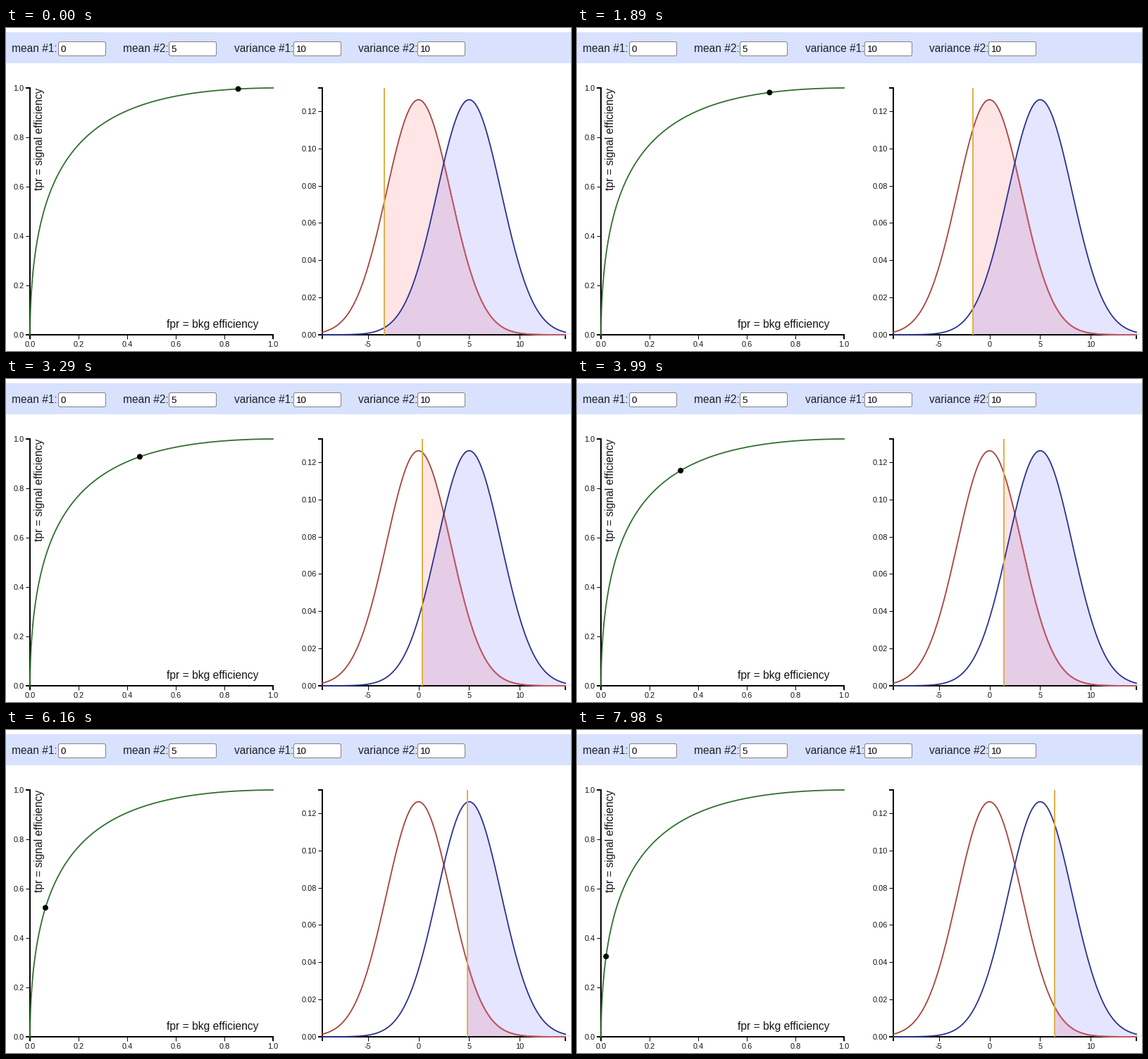
Animation, 802 px wide and 458 px high, one loop 8 s. Source, as a matplotlib script:

```python
import math

import numpy as np
import matplotlib.pyplot as plt
from matplotlib.animation import FuncAnimation
from matplotlib.patches import Circle, FancyBboxPatch, Rectangle

W, H, DPI = 802, 458, 64
LOOP, INTERVAL, STEP = 8000, 20, 70
PT = 72 / DPI  # points per pixel

MEAN1, MEAN2, SIGMA = 0, 5, math.sqrt(10)
X_MIN, X_MAX = MEAN1 - 3 * SIGMA, MEAN2 + 3 * SIGMA
PEAK = 1 / (SIGMA * math.sqrt(2 * math.pi))
TOP, BASE = 85, 435
ROC_L, ROC_R = 34, 379
PDF_L, PDF_R = 449, 794

RED, BLUE, GREEN = "#a8433c", "#2b3192", "#2f702d"

# The dragged threshold: time in ms, value
KEY_T = np.array([0, 1190, 2590, 3990, 4900, 6160, 7980])
KEY_V = np.array([-3.37, -2.42, -0.66, 1.41, 2.53, 4.82, 6.43])
KEY_M = np.gradient(KEY_V, KEY_T)


def threshold(t):
    """Smooth Hermite path through the keys."""
    t = min(max(t, 0), KEY_T[-1])
    i = min(int(np.searchsorted(KEY_T, t, side="right")) - 1, len(KEY_T) - 2)
    d = KEY_T[i + 1] - KEY_T[i]
    s = (t - KEY_T[i]) / d
    return ((2 * s**3 - 3 * s**2 + 1) * KEY_V[i]
            + (s**3 - 2 * s**2 + s) * d * KEY_M[i]
            + (3 * s**2 - 2 * s**3) * KEY_V[i + 1]
            + (s**3 - s**2) * d * KEY_M[i + 1])


def pdf(x, mean):
    return PEAK * np.exp(-((x - mean) ** 2) / (2 * SIGMA**2))


def above(x, mean):
    """Share of the distribution above x."""
    return 0.5 * math.erfc((x - mean) / (SIGMA * math.sqrt(2)))


def pdf_x(x):
    return PDF_L + (x - X_MIN) / (X_MAX - X_MIN) * (PDF_R - PDF_L)


def pdf_y(p):
    return BASE - p / (1.05 * PEAK) * (BASE - TOP)


def roc_point(x):
    return (ROC_L + above(x, MEAN1) * (ROC_R - ROC_L),
            BASE - above(x, MEAN2) * (BASE - TOP))


def curve(mean, lo, hi):
    x = np.linspace(lo, hi, 160)
    return pdf_x(x), pdf_y(pdf(x, mean))


def area(mean, lo):
    x, y = curve(mean, lo, X_MAX)
    return np.column_stack([np.r_[x[0], x, x[-1]], np.r_[BASE, y, BASE]])


fig = plt.figure(figsize=(W / DPI, H / DPI), dpi=DPI, facecolor="white")
ax = fig.add_axes([0, 0, 1, 1])
ax.set_xlim(0, W)
ax.set_ylim(H, 0)
ax.axis("off")


def line(x, y, color="black", width=1.0, z=3, **kw):
    return ax.plot(x, y, color=color, lw=width * PT, zorder=z, **kw)[0]


def label(x, y, s, size, color="#141414", **kw):
    ax.text(x, y, s, fontsize=size * PT, family="Liberation Sans",
            color=color, va="baseline", zorder=6, **kw)


def field(x, name, value, box_x):
    label(x, 34, name, 15.5, color="#1f222c")
    ax.add_patch(FancyBboxPatch((box_x + 0.5, 19.5), 67, 20,
                                boxstyle="round,pad=0,rounding_size=2.5",
                                fc="white", ec="#80828a", lw=PT, zorder=2))
    label(box_x + 3.5, 34, value, 13.33, color="black")


def axes_frame(left, right, x_ticks, y_ticks):
    """Axis lines with end ticks; ticks are (position, text) pairs."""
    line([left - 6, left, left, left - 6], [TOP, TOP, BASE, BASE], width=2,
         solid_joinstyle="miter", solid_capstyle="butt")
    line([left, left, right, right], [BASE + 6, BASE, BASE, BASE + 6],
         width=2, solid_joinstyle="miter", solid_capstyle="butt")
    for x, s in x_ticks:
        line([x, x], [BASE, BASE + 6], solid_capstyle="butt")
        label(x, 452, s, 11, ha="center")
    for y, s in y_ticks:
        line([left - 6, left], [y, y], solid_capstyle="butt")
        label(left - 8.5, y + 4, s, 11, ha="right")


# Header
ax.add_patch(Rectangle((0, 6), W, 44, fc="#d8e2fe", ec="none", zorder=1))
field(8, "mean #1:", "0", 74)
field(166, "mean #2:", "5", 231)
field(323.5, "variance #1:", "10", 408)
field(500, "variance #2:", "10", 584)

# Efficiency curve
fifths = np.arange(6) / 5
axes_frame(ROC_L, ROC_R,
           [(ROC_L + v * (ROC_R - ROC_L), f"{v:.1f}") for v in fifths],
           [(BASE - v * (BASE - TOP), f"{v:.1f}") for v in fifths])
label(359, 425, "fpr = bkg efficiency", 15.6, ha="right")
label(52, 84.5, "tpr = signal efficiency", 15.5, ha="right",
      rotation=90, rotation_mode="anchor")
roc = np.array([roc_point(x) for x in np.linspace(-13, 18, 220)])
line(roc[:, 0], roc[:, 1], GREEN, 1.8, z=4)

# Distributions
axes_frame(PDF_L, PDF_R,
           [(pdf_x(v), str(v)) for v in (-5, 0, 5, 10)],
           [(pdf_y(v), f"{v:.2f}") for v in np.arange(7) * 0.02])
line([PDF_R + 1, W], [BASE - 1, BASE - 1], "#e3e3f8", 1.5, z=2)
line(*curve(MEAN1, X_MIN, X_MAX), RED, 1.8, z=4)
line(*curve(MEAN2, X_MIN, X_MAX), BLUE, 1.8, z=4.2)

red_area = ax.fill([0], [0], color="red", alpha=0.1, lw=0, zorder=1)[0]
blue_area = ax.fill([0], [0], color="blue", alpha=0.1, lw=0, zorder=1.1)[0]
covered = line([], [], "#c25a6c", 1.8, z=4.1)
cut = line([], [], "#e0b04c", 2, z=5, solid_capstyle="butt")
dot = ax.add_patch(Circle((0, 0), 4, fc="black", ec="none", zorder=5))


def update(i):
    t = (i * INTERVAL + INTERVAL // 2) // STEP * STEP
    v = threshold(t)
    red_area.set_xy(area(MEAN1, v))
    blue_area.set_xy(area(MEAN2, v))
    covered.set_data(*curve(MEAN1, max(v, (MEAN1 + MEAN2) / 2), X_MAX))
    x = pdf_x(v)
    cut.set_data([x, x], [TOP, BASE])
    dot.center = roc_point(v)
    return red_area, blue_area, covered, cut, dot


anim = FuncAnimation(fig, update, frames=LOOP // INTERVAL, interval=INTERVAL,
                     repeat=True, repeat_delay=0)
plt.show()
```
